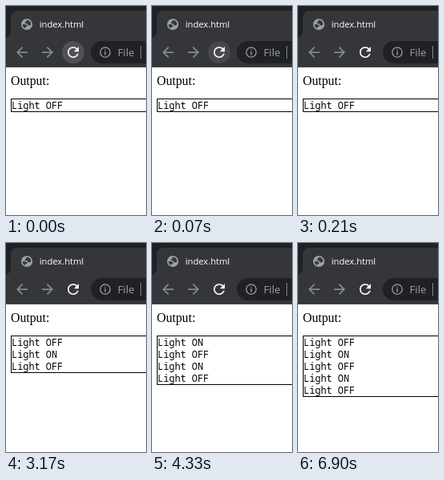
These frames come from a looping animation (175x262 px, 8 s). An HTML page:

```html
<!DOCTYPE html>
<html lang="en">
<head>
<meta charset="utf-8">
<title>Light log</title>
<style>
  html, body { margin: 0; width: 100%; height: 100%; overflow: hidden; background: #fff; }
  svg { display: block; width: 100vw; height: 100vh; }
  .ui { font-family: "Open Sans", "Noto Sans", sans-serif; font-weight: 500; }
  .log { font: 11.9px "Noto Sans Mono", "DejaVu Sans Mono", monospace; white-space: pre; }
</style>
</head>
<body>
<svg viewBox="0 0 175 262" xmlns="http://www.w3.org/2000/svg">
  <defs>
    <path id="arrow" d="M8 -1H-4.17L1.42 -6.59 0 -8-8 0 0 8 1.41 6.59-4.17 1H8z"/>
  </defs>
  <rect width="175" height="262" fill="#fff"/>

  <!-- tab strip and toolbar -->
  <rect width="175" height="77" fill="#202124"/>
  <path d="M-2 40A8 8 0 0 0 6 32V14A8 8 0 0 1 14 6H175V76H-2z" fill="#35363a"/>
  <rect y="76" width="175" height="1" fill="#4b4c4f"/>
  <g transform="translate(26 23)">
    <circle r="7.1" fill="#9aa0a6"/>
    <path fill="#35363a" d="M-5.3 0H-2.6C-.5 0 .5 1 .4 3H-1.8V5A5.3 5.3 0 0 1-5.3 0zM5.3 0C4.8 .9 4 1.3 3 1.3 1.4 1.3 .6 .5 .6-1H-2Q-3-3.2-.6-3.2V-5.3A5.3 5.3 0 0 1 5.3 0z"/>
  </g>
  <text class="ui" x="41.7" y="27" font-size="11.2" fill="#fff">index.html</text>

  <g fill="#7f8a98">
    <use href="#arrow" transform="translate(20 58) scale(.875)"/>
    <use href="#arrow" transform="translate(52 58) scale(-.875 .875)"/>
  </g>
  <circle id="hover" cx="84" cy="58" r="14" fill="#505155"/>
  <path transform="translate(73.5 47.5) scale(.875)" fill="#f1f3f4" d="M17.65 6.35C16.2 4.9 14.21 4 12 4c-4.42 0-7.99 3.58-7.99 8s3.57 8 7.99 8c3.73 0 6.84-2.55 7.73-6h-2.08c-.82 2.33-3.04 4-5.65 4-3.31 0-6-2.69-6-6s2.69-6 6-6c1.66 0 3.14.69 4.22 1.78L13 11h7V4l-2.35 2.35z"/>

  <!-- address bar -->
  <path d="M175 44H120a14 14 0 0 0 0 28H175z" fill="#202124"/>
  <g fill="#9aa0a6">
    <circle cx="124" cy="58" r="6.2" fill="none" stroke="#9aa0a6" stroke-width="1.3"/>
    <path d="M123.3 57h1.4v4.5h-1.4zM123.3 54.4h1.4v1.4h-1.4z"/>
    <text class="ui" x="139.5" y="63" font-size="13.3">File</text>
    <rect x="168" y="50" width="1" height="16" fill="#80868b"/>
  </g>

  <!-- page -->
  <text x="6" y="99" font-family="'Liberation Serif', 'Times New Roman', serif" font-size="15.8">Output:</text>
  <rect id="box" x="6.5" y="116.5" width="180" fill="none" stroke="#000"/>
  <g id="log" class="log"></g>
</svg>
<script>
  const LOOP = 8000, ROW = 15;
  const switches = [0, 610, 3170, 4330, 6900];
  const $ = id => document.getElementById(id);
  const hover = $("hover"), box = $("box");

  const rows = switches.map((_, i) => {
    const row = document.createElementNS("http://www.w3.org/2000/svg", "text");
    row.setAttribute("x", 7);
    row.setAttribute("y", 129 + i * ROW);
    $("log").append(row);
    return row;
  });

  function draw(t) {
    const count = switches.filter(s => s <= t).length;
    // newest entry on top, states alternate
    rows.forEach((row, i) => {
      row.textContent = i < count ? "Light " + ((count - 1 - i) % 2 ? "ON" : "OFF") : "";
    });
    box.setAttribute("height", count * ROW + 1);
    hover.setAttribute("opacity", Math.max(0, 1 - Math.floor(t / 70) / 3));
  }

  const start = performance.now();
  function tick() {
    draw((performance.now() - start) % LOOP);
    requestAnimationFrame(tick);
  }
  tick();
</script>
</body>
</html>
```
